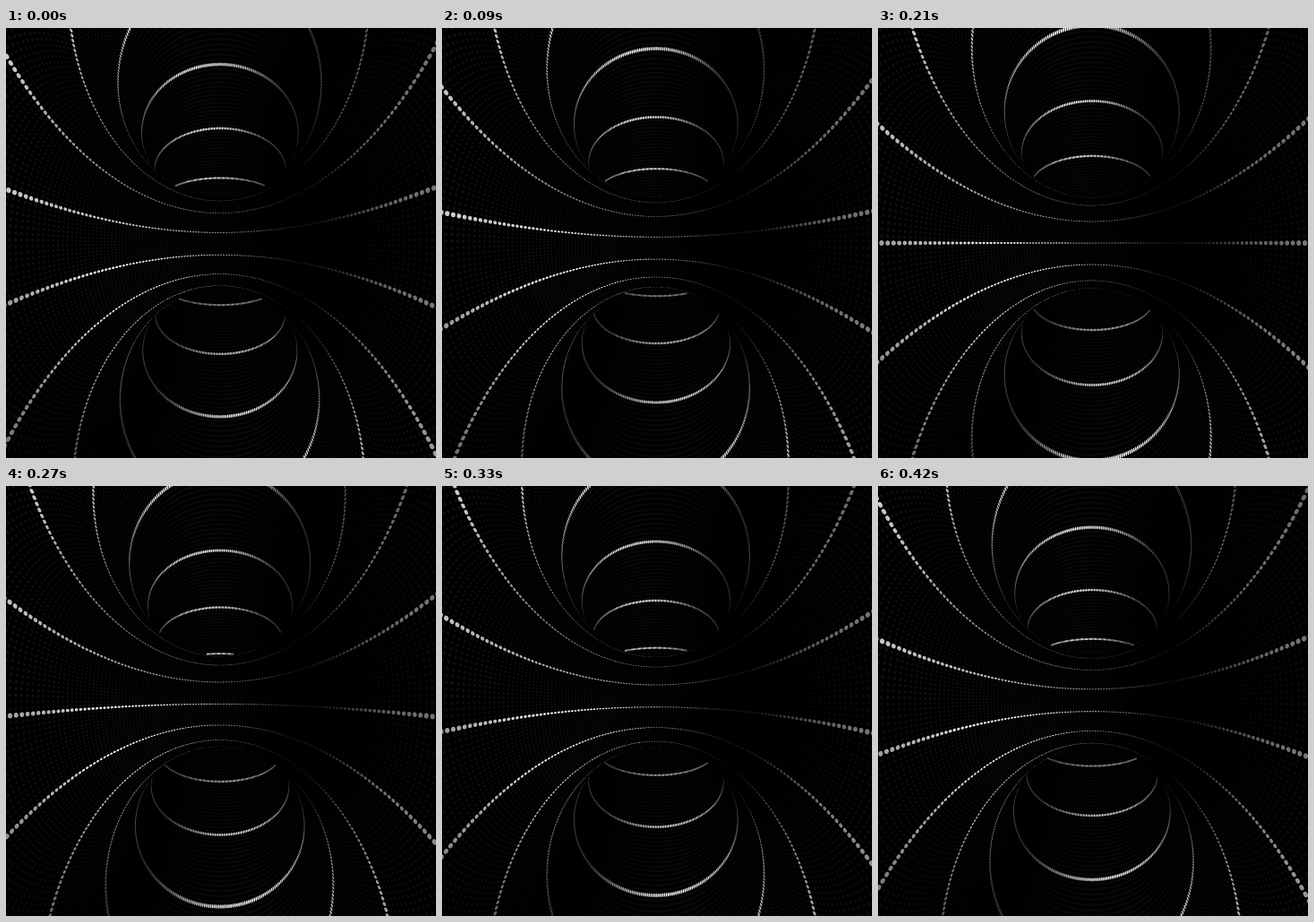
An HTML page with a canvas for the animation above (450 ms loop, 480x480 px).

```html
<!DOCTYPE html>
<html lang="en">
<head>
<meta charset="utf-8">
<title>Inside a torus</title>
<style>
  html, body { margin: 0; width: 100%; height: 100%; overflow: hidden; background: #000; }
  canvas { display: block; width: 100vw; height: 100vh; }
</style>
</head>
<body>
<canvas id="stage" width="480" height="480"></canvas>
<script>
const SIZE = 480, LOOP = 450, STEP = 30;
const TAU = Math.PI * 2, DEG = Math.PI / 180;

// Torus around the x axis; the camera sits inside the tube at z = 1.
const R = 0.6551, r = 0.432, WIDE = 1.01, FOCAL = 223.5, CAM_X = 0.0058;
const DOTS = 256, BAND = 16, CELL = TAU / DOTS;

const bell = (x, w) => Math.exp(-(x * x) / (w * w));

function surface(u, v) {
  const q = R + r * Math.cos(v);
  return { x: r * Math.sin(v) * WIDE, y: q * Math.sin(u), z: q * Math.cos(u) };
}

function project(p) {
  const k = FOCAL / (1 - p.z);
  return { x: SIZE / 2 + (p.x - CAM_X) * k, y: SIZE / 2 - p.y * k };
}

function facesCamera(u, v, p) {
  const c = Math.cos(v);
  return c * (Math.sin(u) * p.y + Math.cos(u) * (p.z - 1)) +
         Math.sin(v) * (p.x - CAM_X) / WIDE > 0;
}

// The line of sight must not leave the tube through the hole.
function isVisible(p) {
  for (let t = 0.1; t < 0.99; t += 0.055) {
    const x = (CAM_X + (p.x - CAM_X) * t) / WIDE;
    const d = Math.hypot(p.y * t, 1 + (p.z - 1) * t) - R;
    if (d * d + x * x > r * r * 1.0005) return false;
  }
  return true;
}

// Highlights: left of the inner wall, and opposite sides of the two tunnels.
function light(u, v) {
  const a = v / DEG;
  const sign = u > 0 ? -1 : 1;
  const s2 = Math.sin(u) ** 2;
  const shift = sign * (15 + 40 * Math.max(0, Math.cos(u)));
  const low = 1 / (1 + Math.exp((u / DEG - 10) / 7));
  const inner = 0.55 * low * bell(a > 50 ? a - 218 : a + 142, 37) - 0.43 * bell(a - 138, 27);
  const outer = (u > 0 ? 0.5 : 0.5 * s2) * bell(a - shift, 48) - 0.32 * s2 * bell(a + sign * 62, 34);
  return Math.max(0.05, Math.min(1, 0.5 + inner + outer));
}

function drawDot(ctx, u, v, bright) {
  const p = surface(u, v);
  if (p.z > 0.93 || !facesCamera(u, v, p)) return;
  const c = project(p);
  if (c.x < -6 || c.y < -6 || c.x > SIZE + 6 || c.y > SIZE + 6 || !isVisible(p)) return;

  const h = CELL * (bright ? 0.38 : 0.25);
  const a = project(surface(u + h, v)), b = project(surface(u, v + h));
  const g = Math.round(255 * light(u, v) * (bright ? 1 : 0.075));
  ctx.fillStyle = `rgb(${g},${g},${g})`;
  ctx.setTransform(a.x - c.x, a.y - c.y, b.x - c.x, b.y - c.y, c.x, c.y);
  if (bright) {
    ctx.beginPath();
    ctx.arc(0, 0, 1, 0, TAU);
    ctx.fill();
  } else {
    ctx.fillRect(-0.9, -0.9, 1.8, 1.8);
  }
}

function render(time) {
  const canvas = document.createElement('canvas');
  canvas.width = canvas.height = SIZE;
  const ctx = canvas.getContext('2d');
  ctx.fillRect(0, 0, SIZE, SIZE);
  const turn = (time - 210) / LOOP * BAND * CELL;
  for (const bright of [false, true]) {
    for (let i = -DOTS / 2; i < DOTS / 2; i++) {
      if ((i % BAND === 0) !== bright) continue;
      for (let j = -DOTS / 2; j < DOTS / 2; j++) {
        drawDot(ctx, i * CELL - turn, (j + 0.5) * CELL, bright);
      }
    }
  }
  return canvas;
}

const stage = document.getElementById('stage').getContext('2d');
const cache = [];

function tick() {
  const n = Math.floor(performance.now() % LOOP / STEP);
  cache[n] = cache[n] || render(n * STEP);
  stage.drawImage(cache[n], 0, 0);
  requestAnimationFrame(tick);
}
tick();
</script>
</body>
</html>
```
